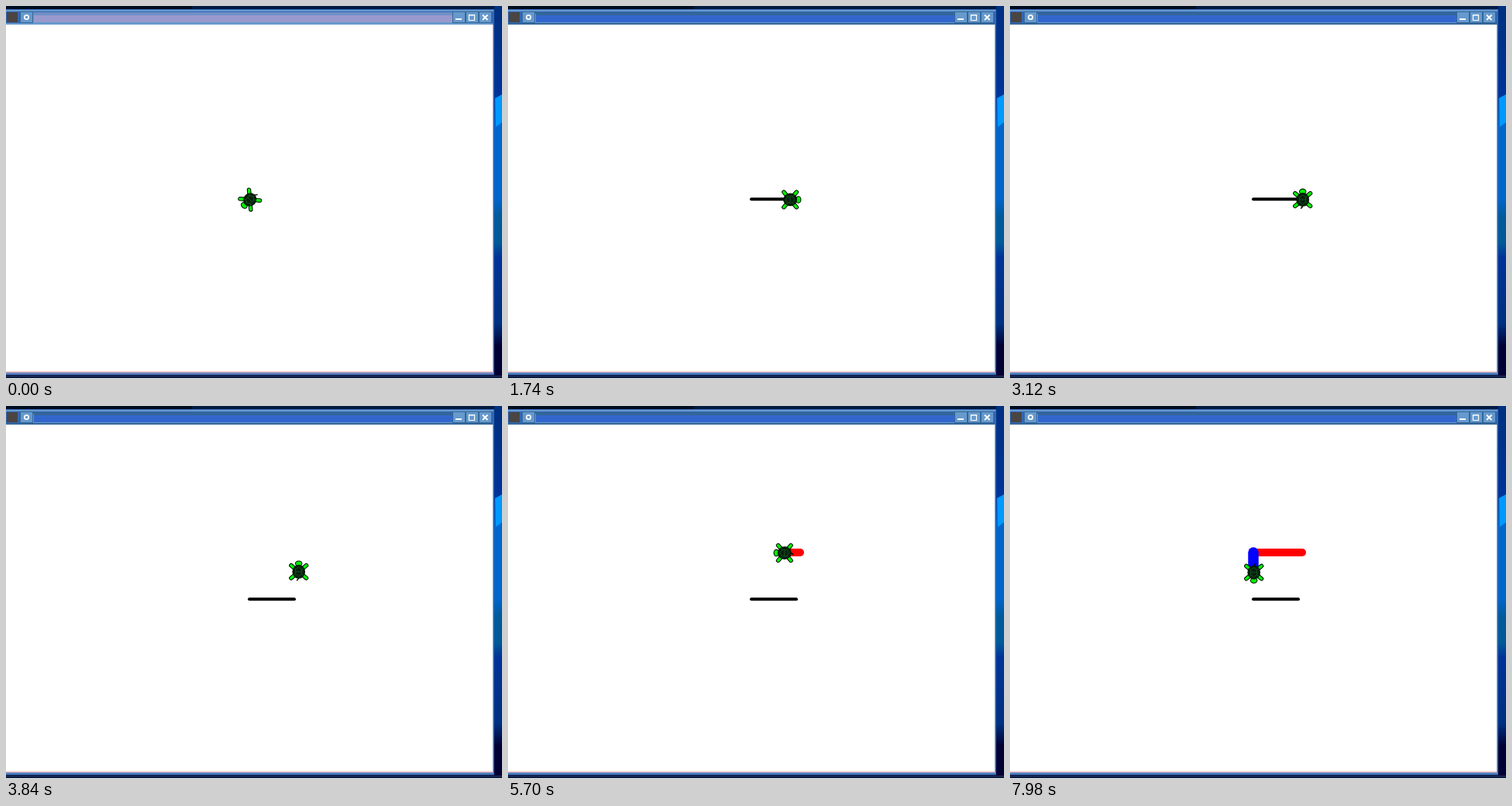
Recreate the animation shown at these times as an HTML page. Size 640 px wide and 480 px high, loop 8000 ms.

```html
<!DOCTYPE html>
<html lang="en">
<head>
<meta charset="utf-8">
<title>Turtle</title>
<style>
  html, body { margin: 0; width: 100%; height: 100%; overflow: hidden; background: #fff; }
  svg { display: block; width: 640px; height: 480px; }
</style>
</head>
<body>
<svg viewBox="0 0 640 480" shape-rendering="auto">
  <defs>
    <linearGradient id="desk" x1="0" y1="0" x2="0" y2="1">
      <stop offset="0" stop-color="#003080"/>
      <stop offset=".24" stop-color="#003399"/>
      <stop offset=".32" stop-color="#0066cc"/>
      <stop offset=".52" stop-color="#0066cc"/>
      <stop offset=".57" stop-color="#005a9c"/>
      <stop offset=".64" stop-color="#005a99"/>
      <stop offset=".68" stop-color="#003399"/>
      <stop offset=".86" stop-color="#003080"/>
      <stop offset=".92" stop-color="#000033"/>
      <stop offset="1" stop-color="#000033"/>
    </linearGradient>
  </defs>

  <!-- desktop -->
  <rect width="640" height="480" fill="#001a40"/>
  <rect width="240" height="4" fill="#000c20"/>
  <rect x="630" width="10" height="477" fill="url(#desk)"/>
  <path d="M631 119L640 114V150L632 156Z" fill="#0099ff"/>
  <rect y="477" width="640" height="1" fill="#333366"/>

  <!-- window -->
  <rect y="4" width="630" height="472" fill="#3366b4"/>
  <rect y="5" width="629" height="2" fill="#6699cc"/>
  <rect id="bar" x="35" y="8" width="541" height="14"/>
  <rect id="barTop" x="35" y="8" width="541" height="4"/>
  <path d="M35.500 10V21.500H576" fill="none" stroke="#6699cc"/>
  <rect id="rule" y="22" width="628" height="2"/>
  <rect x="1" y="8" width="14" height="13" fill="#4a4543"/>
  <g id="buttons"></g>
  <circle cx="26.500" cy="14.500" r="2.700" fill="none" stroke="#fff" stroke-width="1.800"/>
  <path d="M580 17H588" stroke="#fff" stroke-width="2"/>
  <path d="M597.500 11.500H604.500V18.500H597.500ZM597 12H605" fill="none" stroke="#fff" stroke-width="1.200"/>
  <path d="M615 11.500L621.500 18M621.500 11.500L615 18" stroke="#fff" stroke-width="1.800"/>
  <rect y="24" width="628" height="448" fill="#fff"/>
  <rect y="471" width="628" height="2" fill="#ffcccc"/>
  <path id="edge" d="M0 474.500H628.500V24" fill="none"/>

  <!-- pen lines -->
  <g fill="none" stroke-linecap="round">
    <path id="black" stroke="#000" stroke-width="4"/>
    <path id="red" stroke="#f00" stroke-width="10"/>
    <path id="blue" stroke="#00f" stroke-width="13.500"/>
  </g>

  <!-- turtle, facing right -->
  <g id="turtle" stroke="#001400" stroke-width="1.100">
    <g id="feet" fill="#0f0"></g>
    <path d="M-7 0Q-9.500 0 -11.500 -2.500" fill="none" stroke-width="1.600"/>
    <ellipse cx="10.500" rx="3.300" ry="4.200" fill="#0e0"/>
    <ellipse rx="8.400" ry="7.800" fill="#061f0c"/>
    <path d="M-3 -4H3L6 0L3 4H-3L-6 0ZM-3 -4L-5 -6M3 -4L5 -6M3 4L5 6M-3 4L-5 6M0 -4V4" fill="none" stroke="#175c20" stroke-width=".8"/>
  </g>
</svg>
<script>
const LOOP = 8000, ACTIVE_AT = 420;
const LEFT = 314, RIGHT = 377, TOP = 189, MID = 249.3;

// time, x, y, heading in degrees counterclockwise from east
const poses = [
  [0, LEFT, MID, 225],
  [800, LEFT, MID, 360],
  [2000, RIGHT, MID, 360],
  [2940, RIGHT, MID, 450],
  [3130, RIGHT, MID, 450],
  [4320, RIGHT, TOP, 450],
  [5230, RIGHT, TOP, 540],
  [5280, RIGHT, TOP, 540],
  [6550, LEFT, TOP, 540],
  [7460, LEFT, TOP, 630],
  [8000, LEFT, 215, 630]
];

// colours of the window frame, by part
const inactive = { bar: '#9999cc', barTop: '#6f8fc6', rule: '#6699cc', edge: '#9999cc' };
const active = { bar: '#3366cc', barTop: '#336699', rule: '#336699', edge: '#6699cc' };

const $ = id => document.getElementById(id);

$('buttons').innerHTML = [18, 576, 593, 610].map(x =>
  `<rect x="${x + .5}" y="7.500" width="16" height="14" fill="#6699cc" stroke="#336699"/>`).join('');

$('feet').innerHTML = [50, -50, 130, -130].map(a =>
  `<rect x="5" y="-2.200" width="10" height="4.400" rx="2.200" transform="rotate(${a})"/>`).join('');

function poseAt(t) {
  let i = 1;
  while (i < poses.length - 1 && t >= poses[i][0]) i++;
  const a = poses[i - 1], b = poses[i];
  const k = (t - a[0]) / (b[0] - a[0]);
  return [1, 2, 3].map(n => a[n] + (b[n] - a[n]) * k);
}

function line(id, shown, d) {
  $(id).setAttribute('d', shown ? d : '');
}

function paintFrame(colours) {
  for (const id in colours) $(id).setAttribute(id === 'edge' ? 'stroke' : 'fill', colours[id]);
}

function draw(t) {
  const [x, y, heading] = poseAt(t);
  paintFrame(t < ACTIVE_AT ? inactive : active);
  $('turtle').setAttribute('transform', `translate(${x + .7} ${y + .6}) rotate(${-heading})`);
  line('black', t > 800, `M${LEFT} ${MID}H${Math.min(t < 2000 ? x : RIGHT, 372)}`);
  line('red', t > 5280, `M${RIGHT} ${TOP}H${t < 6550 ? x : LEFT}`);
  line('blue', t > 7460, `M${LEFT} ${TOP}V${y}`);
}

function tick(now) {
  draw(now % LOOP);
  requestAnimationFrame(tick);
}
draw(0);
requestAnimationFrame(tick);
</script>
</body>
</html>
```
